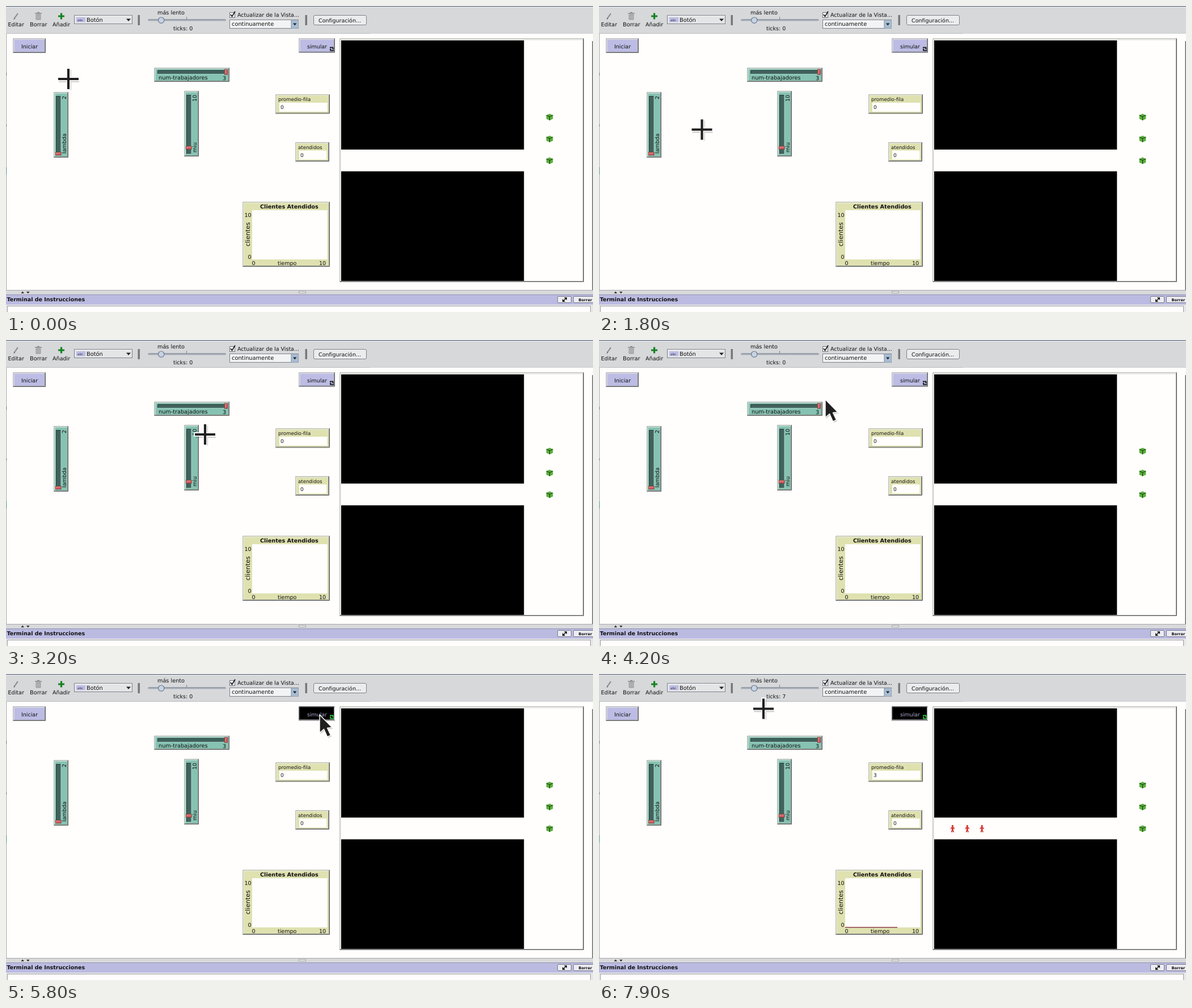
Write an HTML page that moves like this. It is 1035 px wide and 541 px high and loops after 8 s.

```html
<!DOCTYPE html>
<html lang="es">
<head>
<meta charset="utf-8">
<style>
html, body { margin: 0; width: 100%; height: 100%; overflow: hidden; background: #fffefc; }
svg { display: block; width: 1035px; height: 541px; }
text { font-family: "DejaVu Sans", sans-serif; white-space: pre; text-rendering: geometricPrecision; }
</style>
</head>
<body>
<svg id="stage" viewBox="0 0 1035 541"></svg>
<script>
const TEAL = '#86c2b2', LILAC = '#bcbce4', SAND = '#dfe1b0', GRAY = '#d7d8da';
const $ = id => document.getElementById(id);

const rect = (x, y, w, h, fill, extra = '') =>
  `<rect x="${x}" y="${y}" width="${w}" height="${h}" fill="${fill}" ${extra}/>`;
const path = (d, fill, extra = '') => `<path d="${d}" fill="${fill}" ${extra}/>`;
const line = (d, color, width = 1, extra = '') =>
  path(d, 'none', `stroke="${color}" stroke-width="${width}" ${extra}`);
const text = (x, y, s, size = 9.6, extra = '') =>
  `<text x="${x}" y="${y}" font-size="${size}" fill="#111" ${extra}>${s}</text>`;
const upright = (x, y, s, size) => text(0, 0, s, size, `transform="translate(${x} ${y}) rotate(-90)"`);
const bold = 'font-weight="bold"';

// Two-line bevel; edge colours: outer and inner for top left, inner and outer for bottom right
const RAISED = ['#a0a29e', '#eef0ea', '#8b8e8b', '#626564'];
const SUNKEN = ['#77777f', '#2a2a2e', '#a9a9b4', '#e2e2e6'];
function panel(left, top, width, height, fill, [a, b, c, d] = RAISED) {
  const x = left - .6, y = top - .6, w = width + .6, h = height + .6;
  return rect(x, y, w, h, fill) +
    line(`M${x + .5} ${y + h}V${y + .5}H${x + w}`, a) +
    line(`M${x + 1.5} ${y + h - 1}V${y + 1.5}H${x + w - 1}`, b) +
    line(`M${x + 1} ${y + h - 1.5}H${x + w - 1.5}V${y + 1}`, c) +
    line(`M${x} ${y + h - .5}H${x + w - .5}V${y}`, d);
}

const groove = (x, y, w, h) => rect(x, y, w, h, '#41625c') +
  line(`M${x + .5} ${y + h}V${y + .5}H${x + w}`, '#24423d') +
  line(`M${x} ${y + h}H${x + w}V${y}`, '#a5d3c7');

const knob = (x, y, w, h) => rect(x + .5, y + .5, w - 1, h - 1, '#d55f5f', 'stroke="#843a3c"') +
  line(`M${x + 1.5} ${y + h - 1.5}V${y + 1.5}H${x + w - 1.5}`, '#e79a97', .8);

const vSlider = (x, y, name, max, knobY) => panel(x, y, 25, 115, TEAL) +
  groove(x + 3, y + 6, 9, 105) + knob(x + 2, knobY, 10.5, 6.2) +
  upright(x + 21, y + 108, name, 9.5) + upright(x + 21, y + (max > 9 ? 18 : 12), max, 9.5);

const monitor = (x, y, w, name, id) => panel(x, y, w, 33.5, SAND) +
  text(x + 4, y + 11, name, 8.6) + rect(x + 6, y + 14, w - 10.5, 15.8, '#fffefc') +
  text(x + 8, y + 25.3, '0', 9, `id="${id}"`);

const cube = (x, y) => `<g transform="translate(${x} ${y}) scale(.0433) translate(-150 -150)">` +
  path('M150 15L285 75V225L150 285L15 225V75Z', '#59b03c') +
  line('M150 285V135L15 75M150 135L285 75', '#10240a', 22) + '</g>';

const person = i => `<g id="p${i}" fill="#d22d28"><g transform="scale(.0433) translate(-150 -150)">` +
  '<circle cx="150" cy="45" r="40"/>' +
  path('M127 79H172V90H195L240 150L225 180L183 133L180 195L210 285L195 300H165L150 225L135 300H105L90 285L120 195L117 133L75 180L60 150L105 90H127Z', '#d22d28') +
  '</g></g>';

const separator = x => rect(x, 16, 4, 18, '#77787a') + line(`M${x + .5} 16V34`, '#a5a6a8');

const toolbar = rect(0, 0, 1035, 49, GRAY) + rect(0, 0, 1035, 1.4, '#59647a') +
  rect(0, 1.4, 1035, 1, '#eceef2') + rect(0, 48, 642, 1, '#b9bbbd') + rect(642, 48, 393, 1, '#cfd0d2') +
  path('M14.5 22.5L15.5 19L20 12.5L21.8 14L17 20.5Z', '#8d8f91') +
  path('M13.5 24.5L14.3 20L16.5 22Z', '#6b6d6f') +
  rect(52.5, 14.5, 9, 10, '#9c9ea0', 'rx="1"') + rect(51, 12.3, 12, 1.5, '#85878a') + rect(55, 10.8, 4, 1.5, '#85878a') +
  line('M54.7 16V23M57 16V23M59.3 16V23', '#c4c5c7') +
  line('M97.5 12.5V23.5M92 18H103', '#138221', 3.2) +
  text(3.5, 36, 'Editar') + text(42, 36, 'Borrar', 9.8) + text(82, 36, 'Añadir') +
  rect(120.5, 16.5, 102, 15, '#e4e5e7', 'stroke="#7c828a"') + line('M121 17.5H222', '#f7f8fa') +
  rect(124, 20, 16, 8.5, '#bdbde6') + text(126, 26.5, 'abc', 5.6, 'fill-opacity=".8"') +
  text(142, 27.5, 'Botón', 9.8) + path('M212 22.5H220L216 27Z', '#222') +
  separator(232) +
  text(267, 14.8, 'más lento', 9.7) +
  rect(250, 23.5, 138, 3, '#a9b0ba', 'rx="1.5"') + line('M251 24H387', '#7e8791') +
  line('M318.5 19V23.5', '#7c8085') +
  '<circle cx="273.7" cy="25.2" r="5.2" fill="#c7d3e2" stroke="#647990" stroke-width="1.2"/>' +
  text(295, 42.5, 'ticks: 0', 9.5, 'id="ticks"') +
  rect(394.5, 11.5, 9, 9, '#f5f6f8', 'stroke="#6c737c"') +
  line('M396 15L398.5 18.5L404 9.5', '#161616', 1.7) +
  text(408, 19.2, 'Actualizar de la Vista...', 9.5) +
  rect(394.5, 24.5, 121, 15, '#f2f3f4', 'stroke="#7c828a"') +
  rect(503, 25, 12.5, 14.5, '#a9bdd2') + line('M503 25V39', '#7b91a8') +
  path('M506 30.5H512.5L509.2 34.5Z', '#1d2630') +
  text(398, 35.3, 'continuamente', 9.8) +
  separator(527) +
  rect(542.5, 16.5, 93, 17, '#ebecee', 'rx="2.5" stroke="#7d8289"') +
  text(551, 28.5, 'Configuración...', 9.5);

const simulate = (id, fill, ink, mark, edges) => `<g id="${id}">` + panel(517, 58, 63, 24.5, fill, edges) +
  text(531, 74.6, 'simular', 9.45, `style="fill:${ink}"`) +
  line('M571.8 75V73.2H576.5V75.2M577 77V78.9H572.3V77', mark, 1.5) +
  path('M574.4 74.6H578.6L576.5 76.8ZM570.2 77.5H574.4L572.3 75.3Z', mark) + '</g>';

const buttons = panel(13, 58, 57, 25, LILAC) + text(27, 75.3, 'Iniciar', 9.5) +
  simulate('idle', LILAC, '#111', '#111', RAISED) +
  simulate('pressed', '#000', '#a9a9cc', '#35d043', SUNKEN);

const widgets = panel(262, 110, 132, 24, TEAL) + groove(267, 113.5, 122, 7) + knob(385, 111.5, 6, 10) +
  text(269, 130.3, 'num-trabajadores', 9.7) + text(382, 130.5, '3', 9.6) +
  vSlider(85, 153, 'lambda', 2, 258) + vSlider(315, 151, 'miu', 10, 247.5) +
  monitor(476, 157, 95, 'promedio-fila', 'queue') + monitor(511, 241.5, 59, 'atendidos', 'served') +
  panel(418, 347, 153, 114, SAND) + rect(434, 361, 132.5, 87, '#fffefc') +
  text(448, 357.8, 'Clientes Atendidos', 9.7, bold) +
  text(420.5, 373, '10') + text(426.5, 446.5, '0') + text(433.5, 458, '0') + text(552, 458, '10') +
  text(479, 458, 'tiempo', 9.5) + upright(430, 425, 'clientes', 11) +
  rect(434, 447.3, 0, 1.3, '#7d2432', 'id="plot"');

const world = panel(589, 58, 430, 430, '#e4e5e2') +
  rect(591, 60.5, 426, 425.7, '#fffefc') +
  rect(591, 60.8, 322.3, 193, '#000') + rect(591, 292.3, 322.3, 193.7, '#000') +
  cube(958.5, 196.3) + cube(958.5, 235) + cube(958.5, 273.4) + [0, 1, 2].map(person).join('');

const terminal = rect(0, 502, 1035, 8, '#d8d9db') + line('M0 502.5H1035', '#a7a8aa') +
  path('M26.5 508H32L29.2 504.5Z', '#333') + path('M36 505H41.5L38.8 508.5Z', '#333') +
  rect(516.5, 504.5, 12, 3, '#e9eaec', 'stroke="#a3a5a8"') +
  rect(0, 510, 1035, 18, '#bbbbe2') + line('M0 510.5H1035', '#8f90ae') +
  text(1.5, 522.2, 'Terminal de Instrucciones', 9.5, bold) +
  rect(972.5, 513.5, 24, 11, '#ececf2', 'rx="1.5" stroke="#777a8c"') +
  line('M982 522L988 516.2M984.5 516H988.3V519.5M981.7 518.5V522.2H985.5', '#111', 1.4) +
  rect(1000.5, 513.5, 40, 11, '#ececf2', 'rx="1.5" stroke="#777a8c"') +
  text(1009.5, 521.7, 'Borrar', 6.6, bold) +
  rect(0, 528, 1035, 13, '#e6e7e8') + rect(2.5, 530.5, 1028, 14, '#fffefc', 'stroke="#9a9c9f"');

const edges = rect(0, 49, 1, 453, '#a4a6a8') + rect(0, 285, 1, 13, '#4c8f80') +
  rect(0, 118, 1, 5, '#646a6c') + rect(0, 209, 1, 4, '#646a6c') + rect(1033.5, 62, 1.5, 440, '#6a6c70');

const cross = 'M0 -18V18M-18 0H18';
const arrow = 'M0 0V32L7.5 25.5L13.5 39L19.5 36.3L13.5 23.5L22 22.5Z';
const cursor = '<g id="cursor"><g id="cross">' +
  line(cross, '#000', 8, 'opacity=".2" transform="translate(1 1.8)"') +
  line('M0 -20V20M-20 0H20', '#fff', 7.4) + line(cross, '#202020', 4.2) + '</g><g id="arrow">' +
  path(arrow, '#000', 'opacity=".22" transform="translate(1.5 2)"') +
  path(arrow, '#202020', 'stroke="#fff" stroke-width="1.4" stroke-linejoin="round"') + '</g></g>';

$('stage').innerHTML = rect(0, 0, 1035, 541, '#fffefc') + edges + toolbar + buttons + widgets + world + terminal + cursor;

// Pointer path: time, x, y
const route = [
  [0, 110, 129], [100, 111, 247], [500, 111, 247], [900, 115, 130], [1200, 121, 166], [1400, 123, 247],
  [1600, 123, 247], [2000, 240, 190], [2300, 355, 153], [2500, 330, 145], [2700, 331, 240], [2800, 331, 240],
  [3200, 351, 167], [3400, 354, 160], [3500, 354, 160], [3900, 430, 110], [4200, 399, 105], [4400, 408, 97],
  [4800, 405, 92], [4900, 405, 92], [5600, 553, 72], [6200, 553, 72], [6400, 480, 72], [6500, 480, 72],
  [6900, 345, 63], [7000, 345, 63], [7100, 290, 61.5], [8000, 290, 61.5]
];
const tickTimes = [6300, 6600, 6800, 7100, 7300, 7600, 7800];
const stepTimes = [6400, 6600, 6800, 7100, 7600, 7800];
const passed = (times, t) => times.filter(s => s <= t).length;
const show = (id, on) => $(id).style.display = on ? '' : 'none';

function pointer(t) {
  const i = route.findIndex(k => k[0] > t), [t0, x0, y0] = route[i - 1], [t1, x1, y1] = route[i];
  const f = (t - t0) / (t1 - t0);
  return [x0 + (x1 - x0) * f, y0 + (y1 - y0) * f];
}

function draw(t) {
  const isArrow = t >= 4100 && t < 4900 || t >= 5400 && t < 6300;
  $('cursor').setAttribute('transform', `translate(${pointer(t)})`);
  show('cross', !isArrow);
  show('arrow', isArrow);

  const running = t >= 5800;
  show('idle', !running);
  show('pressed', running);

  const ticks = passed(tickTimes, t), head = passed(stepTimes, t);
  let queue = 0;
  for (let i = 0; i < 3; i++) {
    const col = head - 2 * i;
    show('p' + i, col > 0);
    $('p' + i).setAttribute('transform', `translate(${597.5 + col * 12.95} 273.3)`);
    if (col > 0) queue++;
  }
  $('ticks').textContent = 'ticks: ' + ticks;
  $('queue').textContent = queue;
  $('plot').setAttribute('width', ticks * 13.15);
}

const start = performance.now();
function frame() {
  const t = (performance.now() - start) % 8000;
  draw(Math.floor(t / 100) * 100);
  requestAnimationFrame(frame);
}
frame();
</script>
</body>
</html>
```
